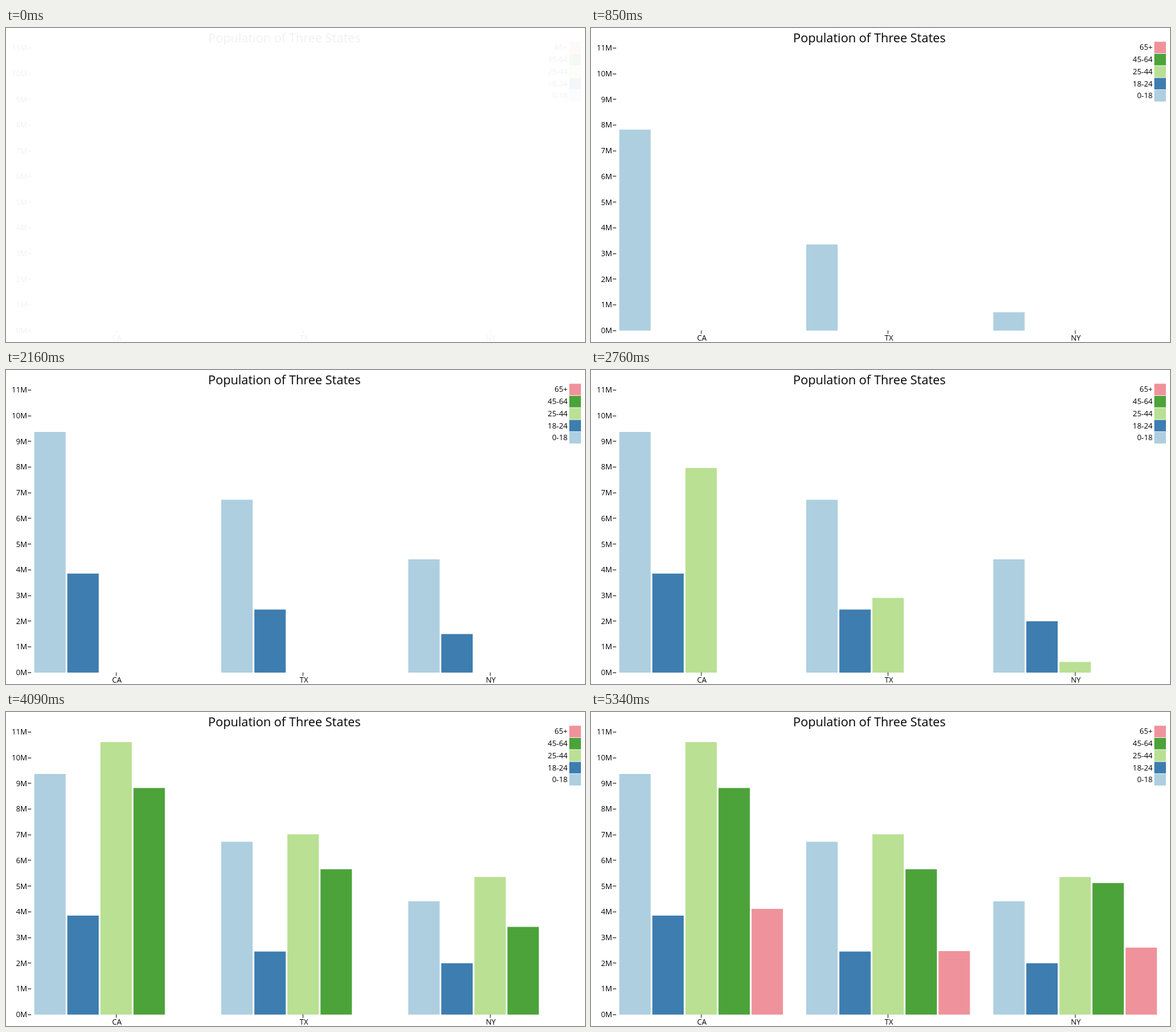
Write an HTML page with a canvas that moves like this. It is 850 px wide and 461 px high and loops after 5810 ms.

```html
<!DOCTYPE html>
<html lang="en">
<head>
<meta charset="utf-8">
<title>Population of Three States</title>
<style>
  html, body { margin: 0; width: 100%; height: 100%; overflow: hidden; background: #fff; }
  canvas { display: block; }
</style>
</head>
<body>
<canvas id="chart" width="850" height="461"></canvas>
<script>
const ctx = document.getElementById('chart').getContext('2d');
const LOOP = 5810;
const BASE = 444.3, PER_MILLION = 37.73;

const ages = [
  { label: '0-18', color: '#adcfe0', millions: [9.365, 6.726, 4.408] },
  { label: '18-24', color: '#3d7db0', millions: [3.854, 2.455, 1.999] },
  { label: '25-44', color: '#b9e093', millions: [10.605, 7.018, 5.355] },
  { label: '45-64', color: '#4ca33a', millions: [8.819, 5.657, 5.120] },
  { label: '65+', color: '#f0929b', millions: [4.114, 2.472, 2.608] },
];
const states = ['CA', 'TX', 'NY'];

const clamp = v => Math.max(0, Math.min(1, v));

function rect(color, x, y, w, h) {
  ctx.fillStyle = color;
  ctx.fillRect(x, y, w, h);
}

function text(str, x, y, size, align) {
  ctx.font = `${size}px "Open Sans", "Noto Sans", sans-serif`;
  ctx.textAlign = align;
  ctx.fillStyle = '#000';
  ctx.fillText(str, x, y);
}

function drawFrame(alpha) {
  ctx.globalAlpha = alpha;
  text('Population of Three States', 408.7, 21, 18.2, 'center');
  for (let m = 0; m <= 11; m++) {
    const y = BASE - m * PER_MILLION;
    text(m + 'M', 31, y + 3.9, 11, 'right');
    rect('#222', 32, Math.floor(y), 5, 1);
  }
  states.forEach((name, s) => {
    const x = 162.2 + s * 274.5;
    rect('#222', Math.floor(x) - 0.5, 444, 1, 5);
    text(name, x + 0.6, 459, 11, 'center');
  });
  ages.forEach(({ label, color }, a) => {
    const y = 91 - a * 17.7;
    rect(color, 827, y, 17, 16.9);
    text(label, 824.5, y + 12.2, 11.2, 'right');
  });
  ctx.globalAlpha = 1;
}

// Each age group takes 20 ticks: bars grow for 12, states start 4 apart.
function drawBars(tick) {
  ages.forEach(({ color, millions }, a) => {
    millions.forEach((value, s) => {
      const n = tick - a * 20 - s * 4;
      const grown = n >= 12 ? 1 : clamp(n * 0.0841 - 0.006);
      const h = value * PER_MILLION * grown;
      if (h) rect(color, 41.5 + s * 274.5 + a * 48.55, BASE - h, 46.1, h);
    });
  });
}

function draw(now) {
  const t = now % LOOP;
  // The picture holds between steps of about 77 ms.
  const step = t < 160 ? 0 : Math.floor((t - 57) / 77.2);
  const tick = Math.floor(1.556 * step - 4.61);
  rect('#fff', 0, 0, 850, 461);
  drawBars(tick);
  drawFrame(clamp(0.06 + 0.188 * (tick + 5)));
}

const start = performance.now();
function loop() {
  draw(performance.now() - start);
  requestAnimationFrame(loop);
}
loop();
</script>
</body>
</html>
```
